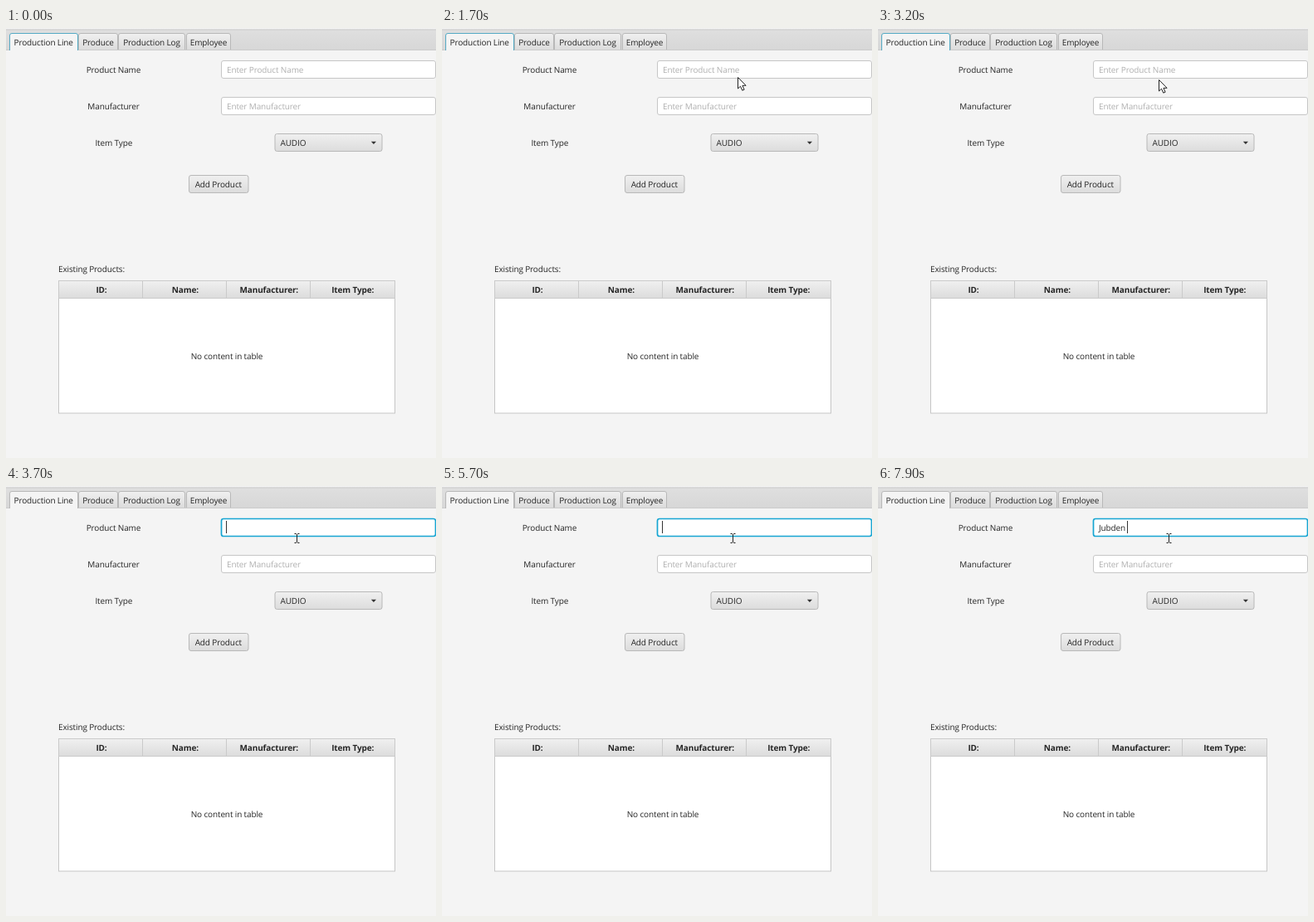
Recreate the animation shown at these times as an HTML page. Size 518x518 px, loop 8000 ms.

```html
<!DOCTYPE html>
<html lang="en">
<head>
<meta charset="utf-8">
<title>Production form</title>
<style>
  html, body { margin: 0; height: 100%; overflow: hidden; background: #f4f4f4; }
  svg { display: block; width: 100vw; height: 100vh; }
  text { font: 10px "Open Sans", sans-serif; letter-spacing: -.13px; fill: #262626; white-space: pre; text-rendering: geometricPrecision; }
  .mid { text-anchor: middle; }
  .bold { font-weight: 700; }
  .hint { fill: #b0b0b0; }
  .field { fill: #fff; stroke: #c6c6c6; }
  .control { fill: url(#face); stroke: #b8b8b8; }
  .header { fill: url(#face); stroke: #cacaca; }
</style>
</head>
<body>
<svg viewBox="0 0 518 518">
  <defs>
    <linearGradient id="face" x2="0" y2="1">
      <stop stop-color="#f0f0f0"/><stop offset="1" stop-color="#dcdcdc"/>
    </linearGradient>
    <linearGradient id="strip" x2="0" y2="1">
      <stop stop-color="#dfdfdf"/><stop offset="1" stop-color="#d7d7d7"/>
    </linearGradient>
  </defs>
  <rect width="518" height="518" fill="#f4f4f4"/>
  <rect y="1.5" width="518" height="25" fill="url(#strip)"/>
  <path d="M0 2H518M0 26.5H518" stroke="#cbcbcb"/>
  <g id="tabs"></g>
  <path id="activeTab" d="M4.5 27V9q0-2.5 2.5-2.5H84q2.5 0 2.5 2.5V27" fill="#f4f4f4"/>
  <text x="9.5" y="20.5">Production Line</text>

  <text class="mid" x="129.5" y="53.5">Product Name</text>
  <text class="mid" x="129.5" y="97.5">Manufacturer</text>
  <text class="mid" x="129.8" y="141.5">Item Type</text>

  <rect id="nameField" class="field" x="259.5" y="39.5" width="258" height="21" rx="2.5"/>
  <text id="nameHint" class="hint" x="266" y="53.5">Enter Product Name</text>
  <text id="nameText" x="266" y="53.5"></text>
  <path id="caret" stroke="#333"/>
  <rect class="field" x="259.5" y="83.5" width="258" height="21" rx="2.5"/>
  <text class="hint" x="266" y="97.5">Enter Manufacturer</text>

  <rect class="control" x="324" y="127.5" width="129" height="21" rx="2.5"/>
  <text x="330.5" y="141.5">AUDIO</text>
  <path d="M439.8 136.7h6.2l-3.1 3.3z" fill="#333"/>
  <rect class="control" x="220.5" y="177.5" width="71.5" height="21" rx="2.5"/>
  <text class="mid" x="255.8" y="191.5">Add Product</text>

  <text x="63" y="293.5">Existing Products:</text>
  <rect class="field" x="63.5" y="304.5" width="405" height="159.5"/>
  <rect class="header" x="63.5" y="304.5" width="405" height="21"/>
  <g id="headers"></g>
  <text class="mid" x="266" y="398.5">No content in table</text>

  <path id="arrow" d="M.5.5V14l3-2.8 2.3 5 2.3-1-2.2-4.9h4.2z" fill="#fff" stroke="#222"/>
  <path id="beam" d="M347.5 57.5h2l1 1 1-1h2M350.5 58V68M347.5 68.5h2l1-1 1 1h2" fill="none" stroke="#222"/>
</svg>
<script>
const $ = id => document.getElementById(id);
const show = (id, on) => $(id).setAttribute("visibility", on ? "visible" : "hidden");
const set = (id, attrs) => { for (const k in attrs) $(id).setAttribute(k, attrs[k]); };

$("tabs").innerHTML = [["Produce", 87, 134], ["Production Log", 135, 215], ["Employee", 217, 270]]
  .map(([name, left, right]) =>
    `<path class="control" d="M${left + .5} 26V9q0-2.5 2.5-2.5H${right - 2}q2.5 0 2.5 2.5V26"/>
     <text class="mid" x="${(left + right) / 2 + .5}" y="20.5">${name}</text>`).join("");

$("headers").innerHTML = ["ID:", "Name:", "Manufacturer:", "Item Type:"].map((name, i) =>
  `<text class="mid bold" x="${115 + i * 100.9}" y="319">${name}</text>` +
  (i ? `<path d="M${63.5 + i * 101} 305V325" stroke="#cacaca"/>` : "")).join("");

const LOOP = 8000, STEP = 100, CLICK = 3700, BLINK = 500;
const WORD = "Jubden ";
const KEYS = [6900, 7100, 7200, 7300, 7300, 7400, 7400];
// Pointer path: time, x, y
const PATH = [[500, 502, 438], [900, 440, 317], [1600, 356, 59], [1900, 356, 59],
              [2400, 312, 32], [2600, 312, 32], [3200, 338, 62], [3600, 350, 62]];

function pointerAt(t) {
  const i = PATH.findIndex(p => p[0] > t);
  if (i < 1) return PATH[i < 0 ? PATH.length - 1 : 0].slice(1);
  const [t0, x0, y0] = PATH[i - 1], [t1, x1, y1] = PATH[i];
  const u = (t - t0) / (t1 - t0), e = u * u * (3 - 2 * u);
  return [x0 + (x1 - x0) * e, y0 + (y1 - y0) * e];
}

function render(t) {
  const focused = t >= CLICK;
  const typed = KEYS.filter(k => k <= t).length;
  const [x, y] = pointerAt(t);

  set("arrow", { transform: `translate(${Math.round(x)} ${Math.round(y)})` });
  show("arrow", t >= PATH[0][0] && t < 3600);
  show("beam", t >= 3600);

  set("activeTab", { stroke: focused ? "#b8b8b8" : "#55aac4" });
  $("nameField").style.cssText = focused ? "stroke:#16a5d2;stroke-width:1.7" : "";
  show("nameHint", !focused);

  $("nameText").textContent = WORD.slice(0, typed);
  const end = typed ? $("nameText").getComputedTextLength() : 0;
  set("caret", { d: `M${Math.round(266 + end) - .5} 42V57` });
  show("caret", focused && (typed || Math.floor((t - CLICK) / BLINK) % 2 === 0));
}

const start = performance.now();
function tick() {
  const t = (performance.now() - start) % LOOP;
  render(Math.floor(t / STEP) * STEP);
  requestAnimationFrame(tick);
}
tick();
</script>
</body>
</html>
```
